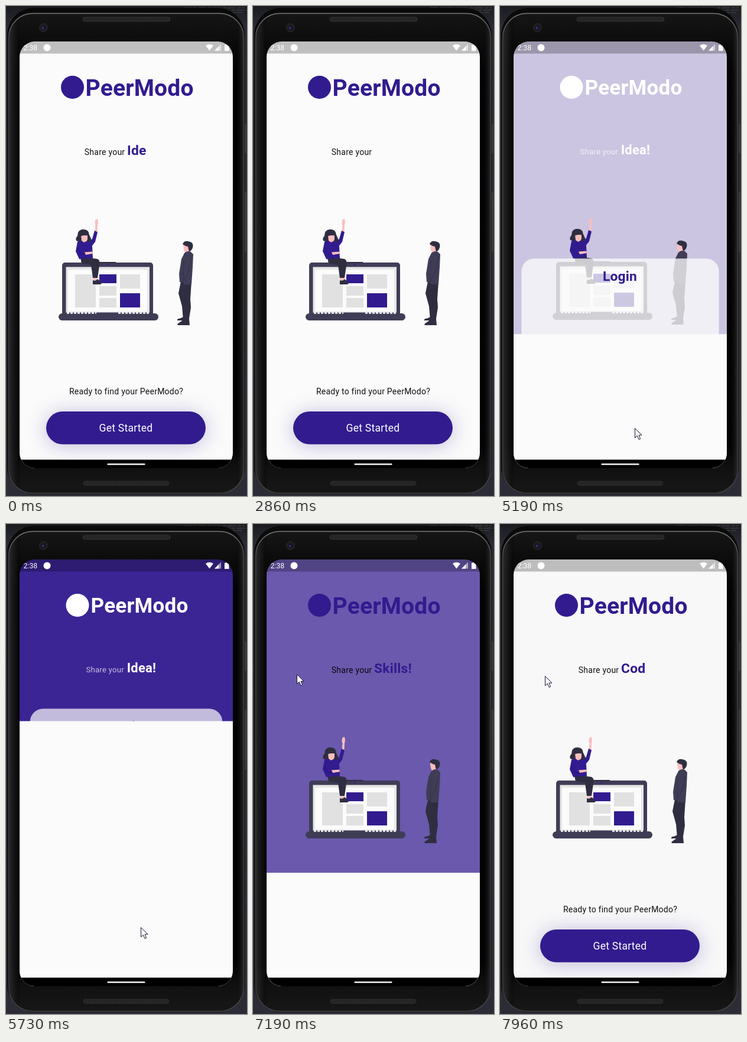
Animation of 408 by 829 pixels, one loop 8 s. Source, as an HTML page:

```html
<!DOCTYPE html>
<html lang="en">
<head>
<meta charset="utf-8">
<title>PeerModo</title>
<style>
  html, body { margin: 0; width: 100%; height: 100%; overflow: hidden; background: #25262d; }
  svg { display: block; width: 408px; height: 829px; font-family: Roboto, Arial, sans-serif; letter-spacing: .22px; }
  .b { font-weight: 700; }
  .ink { fill: #321b8f; }
  .dark { fill: #2f2e41; }
  .slate { fill: #3f3d56; }
  .skin { fill: #fbbebe; }
  .tile { fill: #e1e1e1; }
</style>
</head>
<body>
<svg viewBox="0 0 408 829">
  <defs>
    <clipPath id="glass"><rect x="23" y="60" width="361" height="722" rx="26"/></clipPath>
    <linearGradient id="shell" x1="0" y1="0" x2="0" y2="1">
      <stop offset="0" stop-color="#161616"/>
      <stop offset=".06" stop-color="#0b0b0b"/>
      <stop offset=".12" stop-color="#030303"/>
      <stop offset=".9" stop-color="#030303"/>
      <stop offset=".95" stop-color="#111"/>
      <stop offset="1" stop-color="#171717"/>
    </linearGradient>
    <linearGradient id="sides">
      <stop offset="0" stop-color="#333" stop-opacity=".8"/>
      <stop offset=".035" stop-color="#111" stop-opacity=".6"/>
      <stop offset=".05" stop-color="#000" stop-opacity="0"/>
      <stop offset=".965" stop-color="#000" stop-opacity="0"/>
      <stop offset="1" stop-color="#333" stop-opacity=".8"/>
    </linearGradient>
    <linearGradient id="rim" x1="0" y1="0" x2="0" y2="1">
      <stop offset="0" stop-color="#777a78"/>
      <stop offset=".05" stop-color="#454646"/>
      <stop offset=".95" stop-color="#3a3a3a"/>
      <stop offset="1" stop-color="#4a4a4a"/>
    </linearGradient>
    <linearGradient id="desk" x1="0" y1="0" x2="0" y2="1">
      <stop offset="0" stop-color="#1b1c1f"/>
      <stop offset=".04" stop-color="#2a2b33"/>
      <stop offset="1" stop-color="#2b2c35"/>
    </linearGradient>
    <pattern id="mesh" width="3" height="3" patternUnits="userSpaceOnUse">
      <rect width="3" height="3" fill="#2c2c2c"/><circle cx="1.5" cy="1.5" r=".9" fill="#131313"/>
    </pattern>
    <filter id="soft" x="-30%" y="-120%" width="160%" height="340%"><feGaussianBlur stdDeviation="17"/></filter>
  </defs>

  <!-- phone -->
  <rect width="408" height="829" fill="url(#desk)"/>
  <path d="M300 3H404M340 7H408M366 11H400" stroke="#55565c" stroke-width=".8" stroke-dasharray="14 3 6 2"/>
  <rect x="401" y="199" width="6" height="50" rx="2" fill="#3b3c40"/>
  <rect x="401" y="314" width="6" height="102" rx="2" fill="#3b3c40"/>
  <rect x="2" y="3" width="402" height="823" rx="46" fill="#0a0a0a"/>
  <rect x="4.5" y="12.5" width="398" height="812" rx="41" fill="url(#shell)"/>
  <rect x="4.5" y="12.5" width="398" height="812" rx="41" fill="url(#sides)" stroke="url(#rim)" stroke-width="1.6"/>
  <rect x="130" y="19" width="148" height="7" rx="3.5" fill="url(#mesh)" stroke="#3a3a3a" stroke-width=".8"/>
  <rect x="131" y="804" width="145" height="7" rx="3.5" fill="url(#mesh)" stroke="#333" stroke-width=".8"/>
  <circle cx="63.500" cy="36.500" r="7" fill="#1c1c1f" stroke="#2b2b2e"/>
  <circle cx="63.500" cy="36.500" r="3.500" fill="#15152b"/>
  <circle cx="62.500" cy="37" r="1.500" fill="#41449a"/>

  <g clip-path="url(#glass)">
    <rect id="page" x="23" y="60" width="361" height="722"/>

    <circle id="logo" cy="137.500" r="19.500"/>
    <text id="brand" class="b">PeerModo</text>
    <text id="share">Share your</text>
    <text id="word" class="b"></text>

    <g id="art">
      <!-- laptop -->
      <rect class="slate" x="95" y="434" width="154" height="92" rx="5"/>
      <rect class="dark" x="140" y="433" width="46" height="2"/>
      <rect x="101.500" y="441.500" width="141.500" height="77" fill="#e6e6e6"/>
      <rect x="105" y="446" width="134" height="71" fill="#fbfbfb"/>
      <circle class="ink" cx="172" cy="437.500" r="1.500"/>
      <path class="tile" d="M117 454h35v56h-35zM158 474h29v16h-29zM158 494h29v16h-29zM193 454h34v24h-34z"/>
      <path class="ink" d="M158 454h29v15h-29zM193 486h34v24h-34z"/>
      <rect class="slate" x="89" y="520" width="169" height="12" rx="6"/>
      <path d="M103 519.500H153M190 519.500H243" stroke="#fbfbfb" stroke-width="2.500" stroke-dasharray="4 2"/>
      <!-- woman -->
      <path class="skin" d="M150.500 382L151.500 371Q149.500 366 151.500 361.500L154.500 360Q157 364 155 371L154.500 383Z"/>
      <path class="ink" d="M138 402L146 394L150 380L155 382.500L151 399L144 408Z"/>
      <path class="dark" d="M122 383Q125 377.500 132 378Q140 378.500 140.500 386L145 396L140 402L134 403L119 397Q117 393 121 389Z"/>
      <path class="skin" d="M127 388H138V394Q137 399 133 401L128 397Z"/>
      <path class="dark" d="M123 389Q126 380 133 380Q140 381 140.500 389Q133 387 128 389Z"/>
      <path class="ink" d="M121 399Q126 395 132 400Q138 396 142 400L146 407L147 427Q136 431 124 428L118 415Z"/>
      <path class="skin" d="M133 416.500L146 415.500L147 419L135 421Z"/>
      <path d="M122 410L127 420L135 421" fill="none" stroke="#281578" stroke-width="1"/>
      <path class="skin" d="M148 457H154V465H148Z"/>
      <path class="dark" d="M127 428Q142 425 155 428Q159 430 158.500 436L155 460H147L144 438L130 436Q126 433 127 428ZM147 464Q152 466 155 462L161 467Q163 471 159 471H147Z"/>
      <!-- man -->
      <path class="skin" d="M300 403L308 401L311 408V418L304 419Q300 414 300 403Z"/>
      <path class="dark" d="M299 403Q301 397 308 398Q317 399 316.500 406Q316 413 310 416L308 407Q303 406 299 403Z"/>
      <path class="skin" d="M295 468H300L299 476H296Z"/>
      <path class="dark" d="M296 466H314L312 496L313 510L310 529L311 540H291Q289 538 293 536L300 531L298 508L292 486Z"/>
      <path class="dark" d="M290 531Q290 528.500 295 528.500L300 526L304 531L300 532H290Z"/>
      <path class="slate" d="M302 418Q307 413 313 416L317 420L316 442L314 471H301L300 467H294L293 453L297 428Z"/>
      <path d="M301 430L300 467M314 425L309 449L301 464" fill="none" stroke="#34324a" stroke-width="1"/>
    </g>

    <text x="203.500" y="656.500" text-anchor="middle" font-size="14.050" fill="#111">Ready to find your PeerModo?</text>
    <rect class="ink" x="66" y="687" width="274" height="59" rx="29" opacity=".25" filter="url(#soft)"/>
    <rect class="ink" x="68" y="686" width="270" height="55.500" rx="27.750"/>
    <text x="203" y="720" text-anchor="middle" font-size="17.560" fill="#fff">Get Started</text>

    <rect id="card" height="800" rx="22" fill="#fbfbfb"/>
    <text id="login" class="b ink" x="203" text-anchor="middle" font-size="22.800">Login</text>
    <rect id="sheet" x="23" width="361" height="722" fill="#fbfbfb"/>

    <!-- system bars -->
    <rect x="23" y="60" width="361" height="20.500" opacity=".24"/>
    <g fill="#fff" letter-spacing="0">
      <text x="29.500" y="75" font-size="12.300">2:38</text>
      <circle cx="69.500" cy="70.500" r="6"/>
      <path d="M338 67Q344.500 62.500 351 67L344.500 75.500Z"/>
      <path d="M353 75.500L364 64.500V75.500Z" opacity=".55"/>
      <path d="M353 75.500L360 68.500V75.500Z"/>
      <path d="M370 66H372V64.500H375.500V66H377.500V76H370Z"/>
    </g>
    <rect x="23" y="767.500" width="361" height="15"/>
    <rect x="171.500" y="774" width="64" height="2.500" rx="1.250" fill="#f2f2f2"/>
  </g>

  <path id="mouse" d="M.5 .5V16.500L4.300 13L7 19.300L9.600 18.200L7 12H12Z" fill="#fff" stroke="#15122e" stroke-width="1" stroke-linejoin="round"/>
</svg>
<script>
const $ = id => document.getElementById(id);
const LOOP = 8000, TICK = 77.35;
const OPEN = 5107, CLOSE = 7107;

// Each word: time it is cleared, then the time of each letter.
const words = [
  ["Idea!", -230, -150, -80, 0, 70, 220],
  ["Skills!", 1230, 1310, 1400, 1550, 1630, 1700, 1780, 1940],
  ["Code!", 2860, 3010, 3090, 3240, 3390, 3470],
  ["Idea!", 4480, 4560, 4640, 4790, 4870, 4950],
  ["Skills!", 5960, 6040, 6120, 6270, 6350, 6430, 6500, 6660],
  ["Code!", 7650, 7800, 7880, 7950, 8200, 8300]
];

// Pointer path: time, x, y
const path = [
  [3080, 332, 811], [3400, 289, 632], [3780, 244, 416], [4010, 217, 324],
  [4180, 195, 372], [4560, 217, 657.5], [4750, 225, 706], [4950, 228, 714],
  [5500, 228, 714], [5725, 228, 682], [5880, 202, 464], [6300, 118, 330],
  [6740, 59, 239], [6880, 74, 254], [7200, 74, 254], [7965, 76, 257]
];

const mix = (a, b, p) => a + (b - a) * p;

// cubic-bezier(.18, 1, .04, 1)
function ease(x) {
  if (x <= 0) return 0;
  if (x >= 1) return 1;
  let lo = 0, hi = 1;
  for (let i = 0; i < 24; i++) {
    const u = (lo + hi) / 2, v = 1 - u;
    if (.54 * u * v * v + .12 * u * u * v + u * u * u < x) lo = u; else hi = u;
  }
  return 1 - (1 - lo) ** 3;
}

// 0 on the welcome view, 1 on the login view
const shown = (t, d) => t < CLOSE ? ease((t - OPEN) / d) : 1 - ease((t - CLOSE) / d);

function typed(t) {
  const [word, , ...keys] = words.filter(w => w[1] <= t).pop();
  return word.slice(0, keys.filter(k => k <= t).length);
}

function pointer(t) {
  let i = path.findIndex(p => p[0] > t);
  if (i < 0) return path[path.length - 1].slice(1);
  if (i === 0) return null;
  const [t0, x0, y0] = path[i - 1], [t1, x1, y1] = path[i];
  const p = (t - t0) / (t1 - t0);
  return [mix(x0, x1, p), mix(y0, y1, p)];
}

function set(id, attrs) {
  for (const k in attrs) $(id).setAttribute(k, attrs[k]);
}

function draw(time) {
  const t = Math.floor((time + 18) / TICK) * TICK;
  const login = time >= 5095 && time < 7107;

  const p = shown(t, 1850);
  set("page", { fill: `rgb(${[[251, 50], [251, 27], [251, 143]].map(c => Math.round(mix(c[0], c[1], p)))})` });

  set("logo", { cx: login ? 121 : 112.5, fill: login ? "#fff" : "#321b8f" });
  set("brand", login ? { x: 143.5, y: 150, "font-size": 35.1, fill: "#fff" }
                     : { x: 134.5, y: 152, "font-size": 39, fill: "#321b8f" });
  set("share", login ? { x: 135.5, y: 250.5, "font-size": 13.17, fill: "#fff", "fill-opacity": .7 }
                     : { x: 132.8, y: 252, "font-size": 14.05, fill: "#000", "fill-opacity": .93 });
  set("word", login ? { x: 204.7, y: 250.5, "font-size": 21.94, fill: "#fff" }
                    : { x: 205, y: 252, "font-size": 22.8, fill: "#321b8f" });
  $("word").textContent = typed(time);
  set("art", { transform: `translate(0 ${login ? -1 : 0})` });

  const c = shown(t, 530), inset = 17.7 * c, top = mix(782, 312.5, c);
  set("card", { x: 23 + inset, y: top, width: 361 - 2 * inset, "fill-opacity": mix(1, .7, c) });
  set("login", { y: top + 37.5 });
  set("sheet", { y: mix(782, 332.6, shown(t, 900)) });

  const m = pointer(t);
  set("mouse", m ? { visibility: "visible", transform: `translate(${m})` } : { visibility: "hidden" });
}

let start;
function frame(now) {
  start ??= now;
  draw((now - start) % LOOP);
  requestAnimationFrame(frame);
}
draw(0);
requestAnimationFrame(frame);
</script>
</body>
</html>
```
